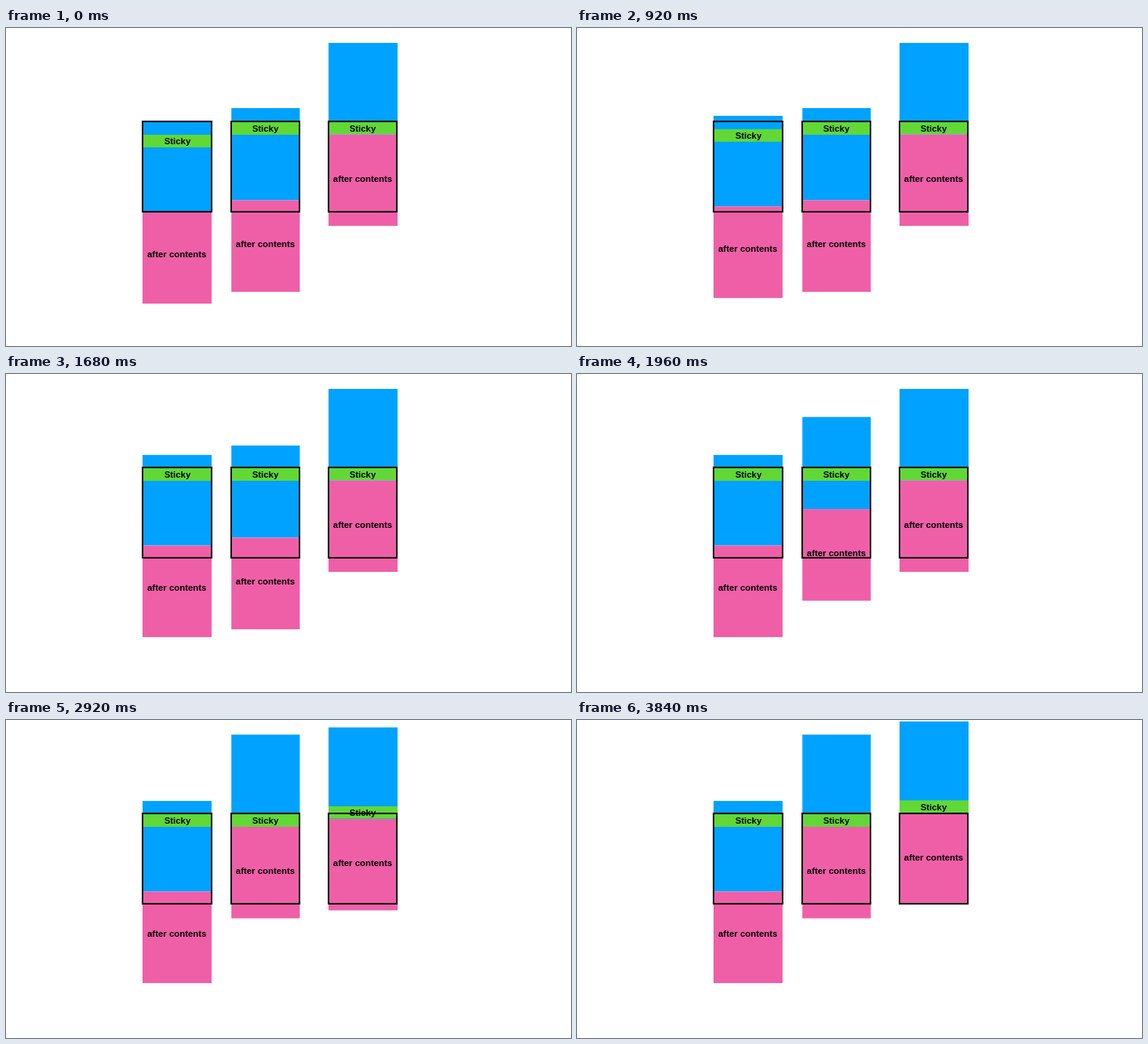
An HTML page that plays this animation: 720x405 px, repeating every 3.88 s.

```html
<!DOCTYPE html>
<html lang="en">
<head>
<meta charset="utf-8">
<title>Sticky positioning</title>
<style>
  html, body { margin: 0; width: 100%; height: 100%; overflow: hidden; background: #fff; }
  svg { display: block; width: 720px; height: 405px; }
  text { font: bold 11.4px "Liberation Sans", Arial, sans-serif; text-anchor: middle; }
  .before { fill: #00a2ff; }
  .after { fill: #ef5fa7; }
  .sticky { fill: #61d836; }
  .viewport { fill: none; stroke: #000; stroke-width: 2; }
</style>
</head>
<body>
<svg id="stage" viewBox="0 0 720 405"></svg>
<script>
const LOOP = 3880, TICK = 40;

// top, split, bottom: edges of the scrolled content before it moves
const columns = [
  { x: 174, width: 88, frameWidth: 88, center: 217.7, stickyCenter: 218.5,
    top: 119, split: 234.4, bottom: 351, label: 292, bar: 136, barHeight: 16,
    start: 485, duration: 930, travel: 15.9, barMoves: true },
  { x: 287.2, width: 87.2, frameWidth: 87, center: 330.5, stickyCenter: 330.5,
    top: 102, split: 219.4, bottom: 336, label: 279, bar: 120, barHeight: 16,
    start: 1466, duration: 910, travel: 83.4, barMoves: false },
  { x: 411, width: 88, frameWidth: 87, center: 454.5, stickyCenter: 454.5,
    top: 19, split: 135.6, bottom: 252, label: 196, bar: 119.5, barHeight: 15.6,
    start: 2433, duration: 910, travel: 17.2, barMoves: true }
];

const stage = document.getElementById("stage");

function add(parent, tag, attributes = {}, content = "") {
  const node = document.createElementNS("http://www.w3.org/2000/svg", tag);
  for (const [key, value] of Object.entries(attributes)) node.setAttribute(key, value);
  node.textContent = content;
  return parent.appendChild(node);
}

function block(parent, name, column, y, height) {
  add(parent, "rect", { class: name, x: column.x, y, width: column.width, height });
}

for (const c of columns) {
  c.content = add(stage, "g");
  block(c.content, "before", c, c.top, c.split - c.top);
  block(c.content, "after", c, c.split, c.bottom - c.split);
  add(c.content, "text", { x: c.center, y: c.label }, "after contents");

  c.header = add(stage, "g");
  block(c.header, "sticky", c, c.bar, c.barHeight);
  add(c.header, "text", { x: c.stickyCenter, y: Math.round(c.bar) + 12 }, "Sticky");

  add(stage, "rect", { class: "viewport", x: Math.floor(c.x), y: 119, width: c.frameWidth, height: 115 });
}

function ease(p) {
  return (1 - Math.cos(Math.PI * Math.min(1, Math.max(0, p)))) / 2;
}

function draw(time) {
  const t = Math.floor((time % LOOP) / TICK) * TICK;
  for (const c of columns) {
    const shift = `translate(0 ${-c.travel * ease((t - c.start) / c.duration)})`;
    c.content.setAttribute("transform", shift);
    if (c.barMoves) c.header.setAttribute("transform", shift);
  }
}

const begin = performance.now();
function tick() {
  draw(performance.now() - begin);
  requestAnimationFrame(tick);
}
tick();
</script>
</body>
</html>
```
